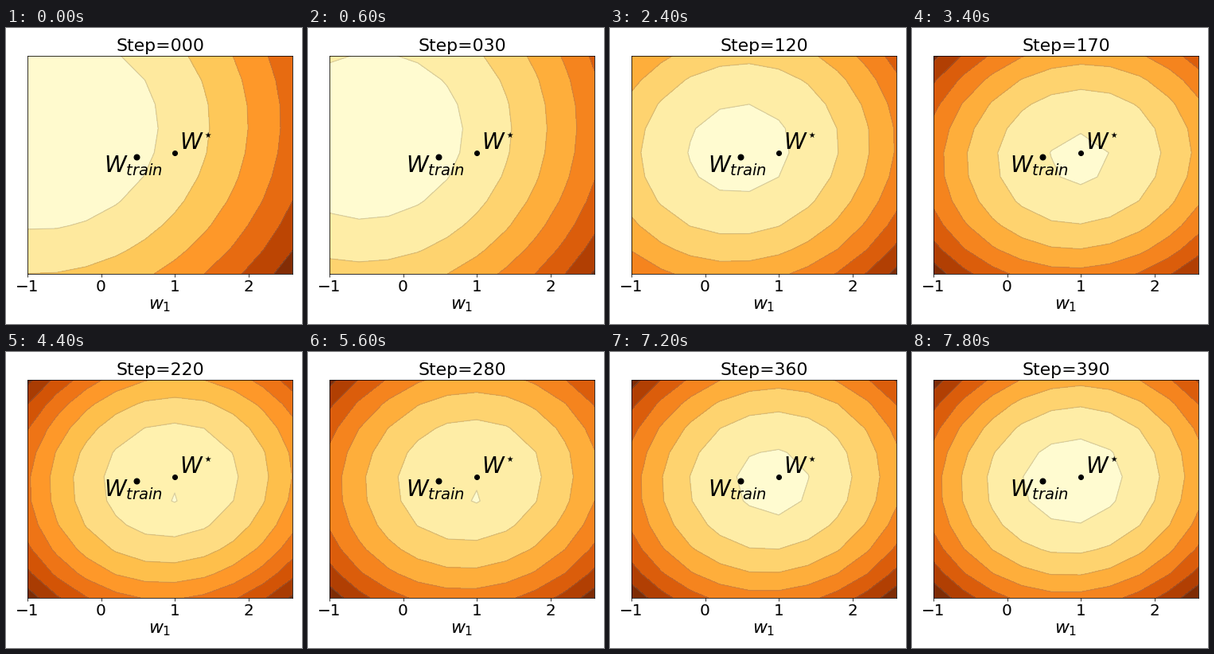
Animation, 372 px wide and 372 px high, one loop 8000 ms. Source, as a matplotlib script:

```python
import numpy as np
import matplotlib.pyplot as plt
from matplotlib.animation import FuncAnimation

SIZE, DPI = 372, 72
X0, X1, Y0, Y1 = 27.02, 360.02, 34.95, 308.95   # axes box in pixels, y down
LO, HI, FRAMES = -1, 2.6, 40
SHEAR = 0.05

w = np.linspace(LO, HI, 10)
W1, W2 = np.meshgrid(w, w)
cmap = plt.get_cmap("YlOrBr")


def loss(i):
    """Quadratic bowl that drifts to the middle and steepens, in band units."""
    cx = np.interp(i, [0, 17, 28], [-0.77, 0.98, 0.9])
    cy = np.interp(i, [0, 17], [1.345, 0.94])
    floor = np.interp(i, [0, 22, 32, 39], [0.08, 1.07, 1.05, 0.48])
    steep = np.interp(i, [0, 22, 28, 32, 39], [0.38, 1.075, 0.96, 0.96, 1.083])
    ratio = np.interp(i, [0, 7, 17, 22], [0.92, 0.79, 1, 0.94])
    dy = W2 - cy
    dx = W1 - cx - SHEAR * dy
    z = floor + steep * (dx**2 + ratio * dy**2)
    z[4, 5] -= np.interp(i, [12, 22], [0, 0.23])   # dent beside the minimum
    return z


fig = plt.figure(figsize=(SIZE / DPI, SIZE / DPI), dpi=DPI, facecolor="white")
ax = fig.add_axes([X0 / SIZE, 1 - Y1 / SIZE, (X1 - X0) / SIZE, (Y1 - Y0) / SIZE])
ax.set(xlim=(LO, HI), ylim=(LO, HI), xticks=[-1, 0, 1, 2], yticks=[])
ax.tick_params(labelsize=20)
ax.set_xlabel("$w_1$", fontsize=22)
title = ax.set_title("Step=000", fontsize=22)

ax.plot(0.484, 0.925, "ko", ms=7, zorder=5)
ax.plot(1, 1, "ko", ms=6, zorder=5)
for x, y, label in [(123, 181.5, "$W_{train}$"), (217.6, 153.4, r"$W^{\star}$")]:
    fig.text(x / SIZE, 1 - y / SIZE, label, fontsize=28, va="baseline")

drawn = []


def update(i):
    while drawn:
        drawn.pop().remove()
    z = loss(i)
    n = int(np.ceil(z.max()))
    edges = list(range(1, n))
    colors = [cmap((k + 0.5) / n) for k in range(n)]
    drawn.append(ax.contourf(w, w, z, levels=[-1, *edges, n], colors=colors))
    drawn.append(ax.contour(w, w, z, levels=edges, colors="gray",
                            alpha=0.3, linewidths=1.2))
    title.set_text(f"Step={10 * i:03d}")
    return drawn


anim = FuncAnimation(fig, update, frames=FRAMES, interval=200,
                     init_func=lambda: [], repeat=True, repeat_delay=0, blit=False)
plt.show()
```
